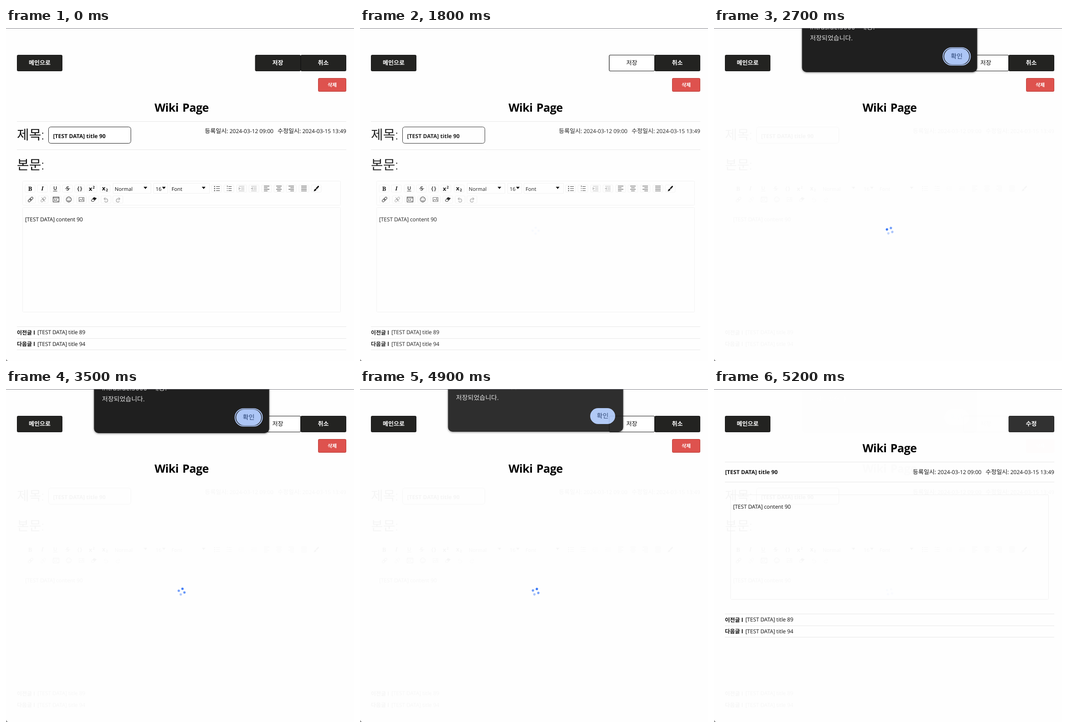
Recreate the animation shown at these times as an HTML page. Size 765x732 px, loop 5.3 s.

```html
<!DOCTYPE html>
<html lang="ko">
<head>
<meta charset="utf-8">
<title>Wiki Page</title>
<style>
html, body { margin: 0; width: 100%; height: 100%; overflow: hidden; background: #fefefe; }
svg { display: block; width: 765px; height: 732px; }
text {
  font: 12px "Open Sans", "Noto Sans", "Noto Sans CJK KR", "Noto Sans CJK", sans-serif;
  text-rendering: geometricPrecision;
  fill: #111; stroke: none; white-space: pre;
}
.ko { font-size: 13px; }
.big { font-size: 29px; font-weight: 300; }
.b { font-weight: 700; }
.mid { text-anchor: middle; }
.w { fill: #fff; }
.tight { letter-spacing: -.11px; }
.title { font-size: 12.1px; font-weight: 700; letter-spacing: .05px; }
.h1 { font-size: 25px; font-weight: 700; letter-spacing: -.5px; word-spacing: 2.5px; text-anchor: middle; fill: #000; }
.tool { font-size: 11.2px; }
.btn { fill: #232321; stroke: #151515; }
.rule { stroke: #e6e6e6; }
.box { fill: none; stroke: #f1f1f1; }
.line { fill: none; stroke: #333; stroke-width: 1.1; }
.off { opacity: .4; }

/* One loop is 53 steps of 100 ms */
.edit, .head, .view, .hover, .spin, .dialog, .ring, .mod rect, .mod text {
  animation: 5.3s step-end infinite;
}
.hover { animation-name: hover; }
.edit { animation-name: edit; }
.head { animation-name: head; }
.view { animation-name: view; }
.spin { animation-name: spin; }
.dialog { animation-name: dialog; }
.ring { animation-name: ring; }
.mod rect { animation-name: mod-box; }
.mod text { animation-name: mod-text; }
.wheel { transform-origin: 386px 445.5px; animation: turn 5.3s steps(53) infinite; }
.wheel circle { fill: #2f70f6; animation: pulse 5.3s linear infinite both; }
.wheel circle:nth-child(2) { animation-delay: .367s; }
.wheel circle:nth-child(3) { animation-delay: .734s; }
.wheel circle:nth-child(4) { animation-delay: 1.101s; }

@keyframes hover {
  0% { opacity: 0; } 7.54% { opacity: .1; } 9.43% { opacity: .54; }
  11.32% { opacity: .84; } 13.2% { opacity: .96; } 15.09%, 100% { opacity: 1; }
}
@keyframes edit {
  0% { opacity: 1; } 33.96% { opacity: .92; } 35.84% { opacity: .38; }
  37.73% { opacity: .06; } 39.62%, 100% { opacity: .035; }
}
@keyframes head { 0% { opacity: 1; } 94.33%, 100% { opacity: .012; } }
@keyframes view { 0% { opacity: 0; } 94.33%, 100% { opacity: 1; } }
@keyframes spin {
  0% { opacity: 0; } 33.96% { opacity: .1; } 35.84% { opacity: .65; }
  37.73% { opacity: 1; } 94.33%, 100% { opacity: .03; }
}
@keyframes turn { from { transform: rotate(-587.7deg); } to { transform: rotate(1145.4deg); } }
@keyframes pulse {
  0%, 33.96% { opacity: .3; } 51.27% { opacity: 1; } 68.58% { opacity: .3; }
  85.9% { opacity: 1; } 100% { opacity: .43; }
}
@keyframes dialog {
  0% { opacity: 0; transform: translateY(-10px); }
  37.73% { opacity: .35; transform: translateY(-10px); }
  39.62% { opacity: .85; transform: translateY(-5.5px); }
  41.5% { opacity: .98; transform: translateY(-1px); }
  43.39% { opacity: 1; transform: none; }
  92.45% { opacity: .93; transform: translateY(-3px); }
  94.33% { opacity: .665; transform: translateY(-7.5px); }
  96.22% { opacity: .2; transform: translateY(-9px); }
  98.11%, 100% { opacity: .005; transform: none; }
}
@keyframes ring { 0% { opacity: 1; } 90.56%, 100% { opacity: 0; } }
@keyframes mod-box {
  0%, 94.33% { height: 23px; fill: #d2d2d2; rx: 0; }
  96.22% { height: 31px; fill: #6c6c6c; rx: 1px; }
  98.11%, 100% { height: 35px; fill: #313131; rx: 2px; }
}
@keyframes mod-text {
  0%, 94.33% { fill: #333; font-weight: 400; transform: translateY(-5.5px); }
  96.22% { fill: #ddd; font-weight: 700; transform: translateY(-2px); }
  98.11%, 100% { fill: #fff; font-weight: 700; transform: none; }
}
</style>
</head>
<body>
<svg viewBox="0 0 765 732" xmlns="http://www.w3.org/2000/svg">
  <defs>
    <rect id="cell" class="box" x="-11" y="-8" width="22" height="16" rx="2"/>
    <path id="caret" d="M-4 -2.5h8l-4 5z"/>
    <g id="dates">
      <text class="ko" x="437" y="231">등록일시:</text><text x="491.5" y="231">2024-03-12 09:00</text>
      <text class="ko" x="597" y="231">수정일시:</text><text x="651.5" y="231">2024-03-15 13:49</text>
    </g>
    <g id="post">
      <rect class="box" x="36.5" y="394.5" width="699" height="230" rx="2"/>
      <text class="tight" x="42" y="424.5">[TEST DATA] content 90</text>
      <path class="rule" d="M24 656.5h724M24 682.5h724M24 707.5h724"/>
      <text class="b" x="24" y="673.5">이전글 l</text>
      <text class="tight" x="69" y="673">[TEST DATA] title 89</text>
      <text class="b" x="24" y="699">다음글 l</text>
      <text class="tight" x="69" y="698.5">[TEST DATA] title 94</text>
    </g>
  </defs>

  <rect width="765" height="732" fill="#fefefe"/>

  <g class="edit">
    <path class="rule" d="M24 205.5h724M24 267.5h724"/>
    <text class="big" x="24" y="244.5">제목:</text>
    <rect x="93.5" y="217.5" width="181" height="36" rx="5" fill="#fff" stroke="#222"/>
    <text class="title" x="103.5" y="241.8">[TEST DATA] title 90</text>
    <use href="#dates"/>
    <text class="big" x="24" y="310.5">본문:</text>

    <rect class="box" x="36.5" y="336.5" width="699" height="53" rx="2"/>
    <g>
      <use href="#cell" x="53" y="353"/><use href="#cell" x="80" y="353"/><use href="#cell" x="108" y="353"/>
      <use href="#cell" x="135" y="353"/><use href="#cell" x="162" y="353"/><use href="#cell" x="189" y="353"/>
      <use href="#cell" x="218" y="353"/><use href="#cell" x="463" y="353"/><use href="#cell" x="490" y="353"/>
      <use href="#cell" x="518" y="353"/><use href="#cell" x="545" y="353"/><use href="#cell" x="573" y="353"/>
      <use href="#cell" x="600" y="353"/><use href="#cell" x="627" y="353"/><use href="#cell" x="655" y="353"/>
      <use href="#cell" x="682" y="353"/>
      <use href="#cell" x="54" y="377"/><use href="#cell" x="82" y="377"/><use href="#cell" x="110" y="377"/>
      <use href="#cell" x="138" y="377"/><use href="#cell" x="166" y="377"/><use href="#cell" x="193" y="377"/>
      <use href="#cell" x="220" y="377"/><use href="#cell" x="246" y="377"/>
      <path class="box" d="M235.5 341.5h83v22h-83zM324.5 341.5h31v22h-31zM360.5 341.5h87v22h-87z"/>
    </g>

    <!-- Inline styles -->
    <text class="mid" style="font:900 13px 'Noto Serif',serif" x="53" y="357.5">B</text>
    <text class="mid" style="font:italic 600 12px 'Noto Serif',serif" x="80" y="357">I</text>
    <text class="mid" style="font-size:11px;font-weight:600" x="108" y="356">U</text>
    <text class="mid" style="font-weight:600" x="135.5" y="357.3">S</text>
    <path class="line" d="M103.5 358.5h9M130 353h11"/>
    <text class="mid" style="font-size:12px;font-weight:600;letter-spacing:2px" x="163" y="356.5">{}</text>
    <text class="b" style="font-size:13px" x="182" y="358">x</text>
    <text class="b" style="font-size:8px" x="190.5" y="352.5">2</text>
    <text class="b" style="font-size:13px" x="211" y="357">x</text>
    <text class="b" style="font-size:8px" x="219.5" y="359">2</text>

    <!-- Drop-downs -->
    <text class="tool" x="239" y="358">Normal</text><use href="#caret" x="306.5" y="351.5"/>
    <text class="tool" x="329" y="358">16</text><use href="#caret" x="347" y="351.5"/>
    <text class="tool" x="364" y="358">Font</text><use href="#caret" x="434.5" y="351.5"/>

    <!-- Lists and indents -->
    <path class="line" d="M462 348.5h8M462 353h8M462 357.5h8M489 348.5h7M489 353h7M489 357.5h7"/>
    <path class="line" stroke-dasharray="2 2.5" style="stroke-width:2" d="M458.5 347.5v11"/>
    <path class="line" d="M486.5 346.5v3M485.5 353h2M485.5 357.5h2"/>
    <path class="line off" d="M512 348h12M517 351.5h7M517 354.5h7M512 358h12M512 351l3 2-3 2zM539 348h12M544 351.5h7M544 354.5h7M539 358h12M542 351l-3 2 3 2z"/>
    <!-- Alignment -->
    <path class="line" d="M567 347.5h12M567 351h8M567 354.5h12M567 358h8M594 347.5h12M596 351h8M594 354.5h12M596 358h8M621 347.5h12M625 351h8M621 354.5h12M625 358h8M649 347.5h12M649 351h12M649 354.5h12M649 358h12"/>
    <!-- Brush -->
    <path d="M676.5 359l1.5-4 2.5-2 2.2 2-2.2 2.8zM681 352.3l4.8-5.2 2 .2.2 1.8-4.8 5.2z"/>

    <!-- Second row -->
    <g class="line">
      <g id="chain" transform="translate(54 377) rotate(-45)">
        <rect x="-6.5" y="-2.2" width="7.5" height="4.4" rx="2.2"/>
        <rect x="-1" y="-2.2" width="7.5" height="4.4" rx="2.2"/>
      </g>
      <use class="off" href="#chain" x="28"/>
      <path class="off" d="M78 372l8 10"/>
      <path d="M103.5 371.5h13v11h-13zM103.5 373.8h13M106 376.5l2 1.7-2 1.8M110 380.5l1.5-4.5M113 380.5h2"/>
      <circle cx="138" cy="377" r="5.6"/>
      <path d="M135 378.5q3 3.4 6 0M136 374.5v1.5M140 374.5v1.5"/>
      <g opacity=".7"><path d="M160.5 372.5h11v9h-11zM161 380l3-3.5 2.5 2.5 2-2 3 3"/><circle cx="168.5" cy="374.7" r=".7"/></g>
      <path d="M187.5 379l6-6.5 5 2-6 6.8h-3.5z"/>
      <path fill="#111" d="M190.5 375.8l3-3.3 5 2-3.2 3.6z"/>
      <path class="off" stroke-width="1.4" d="M216 375.5h4.2a3.6 3.6 0 1 1-3.5 4.8M218.5 372.5l-3 3 3 3M250 375.5h-4.2a3.6 3.6 0 1 0 3.5 4.8M247.5 372.5l3 3-3 3"/>
    </g>
    <use href="#post"/>
  </g>

  <rect class="btn" x="24.5" y="59.5" width="99" height="35" rx="2"/>
  <text class="ko b mid w" x="74" y="81.3">메인으로</text>

  <g class="head">
    <rect class="btn" x="548" y="59.5" width="99.5" height="35" rx="2"/>
    <text class="ko b mid w" x="597.5" y="81.3">저장</text>
    <g class="hover">
      <rect x="548" y="59.5" width="99.5" height="35" rx="2" fill="#fff" stroke="#151515"/>
      <text class="ko mid" style="font-weight:500" x="597.5" y="81.3">저장</text>
    </g>
    <rect class="btn" x="648" y="59.5" width="99.5" height="35" rx="2"/>
    <text class="ko b mid w" x="697.5" y="81.3">취소</text>
    <rect x="686.5" y="110.5" width="61" height="29" rx="2" fill="#de524e" stroke="#b83c38"/>
    <text class="b mid w" style="font-size:11px" x="717" y="129">삭제</text>
    <text class="h1" x="386" y="183.5">Wiki Page</text>
  </g>

  <g class="view">
    <text class="h1" x="386" y="139">Wiki Page</text>
    <path class="rule" d="M24 160.5h724M24 204.5h724"/>
    <text class="title" x="24.5" y="187">[TEST DATA] title 90</text>
    <use href="#dates" y="-44.5"/>
    <use href="#post" y="-162"/>
    <g class="mod">
      <rect x="648" y="59.5" width="99.5" height="35" stroke="#1c1c1c"/>
      <text class="ko mid" x="697.5" y="81.3">수정</text>
    </g>
  </g>

  <g class="spin">
    <g class="wheel">
      <circle cx="386" cy="439" r="2.6"/>
      <circle cx="392.5" cy="445.5" r="2.6"/>
      <circle cx="386" cy="452" r="2.6"/>
      <circle cx="379.5" cy="445.5" r="2.6"/>
    </g>
  </g>

  <g class="dialog">
    <rect x="193.5" y="-60" width="385" height="157" rx="10" fill="#1f1f1f" style="filter:drop-shadow(0 1px 2px rgba(0,0,0,.5))"/>
    <text style="font-size:15px;fill:#e3e3e3" x="211" y="3">intraside:5000</text>
    <text style="font-size:15px;fill:#e3e3e3" x="322" y="3">내용:</text>
    <text style="font-size:14px;fill:#e3e3e3" x="211" y="27">저장되었습니다.</text>
    <rect class="ring" x="503.5" y="43.5" width="60" height="38" rx="19" fill="none" stroke="#adc6f6" stroke-width="2"/>
    <rect x="506" y="45" width="55" height="35" rx="17.5" fill="#adc6f6"/>
    <text class="mid" style="font-size:14px;fill:#253f70" x="533.5" y="67">확인</text>
  </g>

  <path d="M0 .5h765" stroke="#7b7b83"/>
  <path d="M0 727q1 4 5 5h-5z" fill="#8a8a8a"/>
</svg>
</body>
</html>
```
